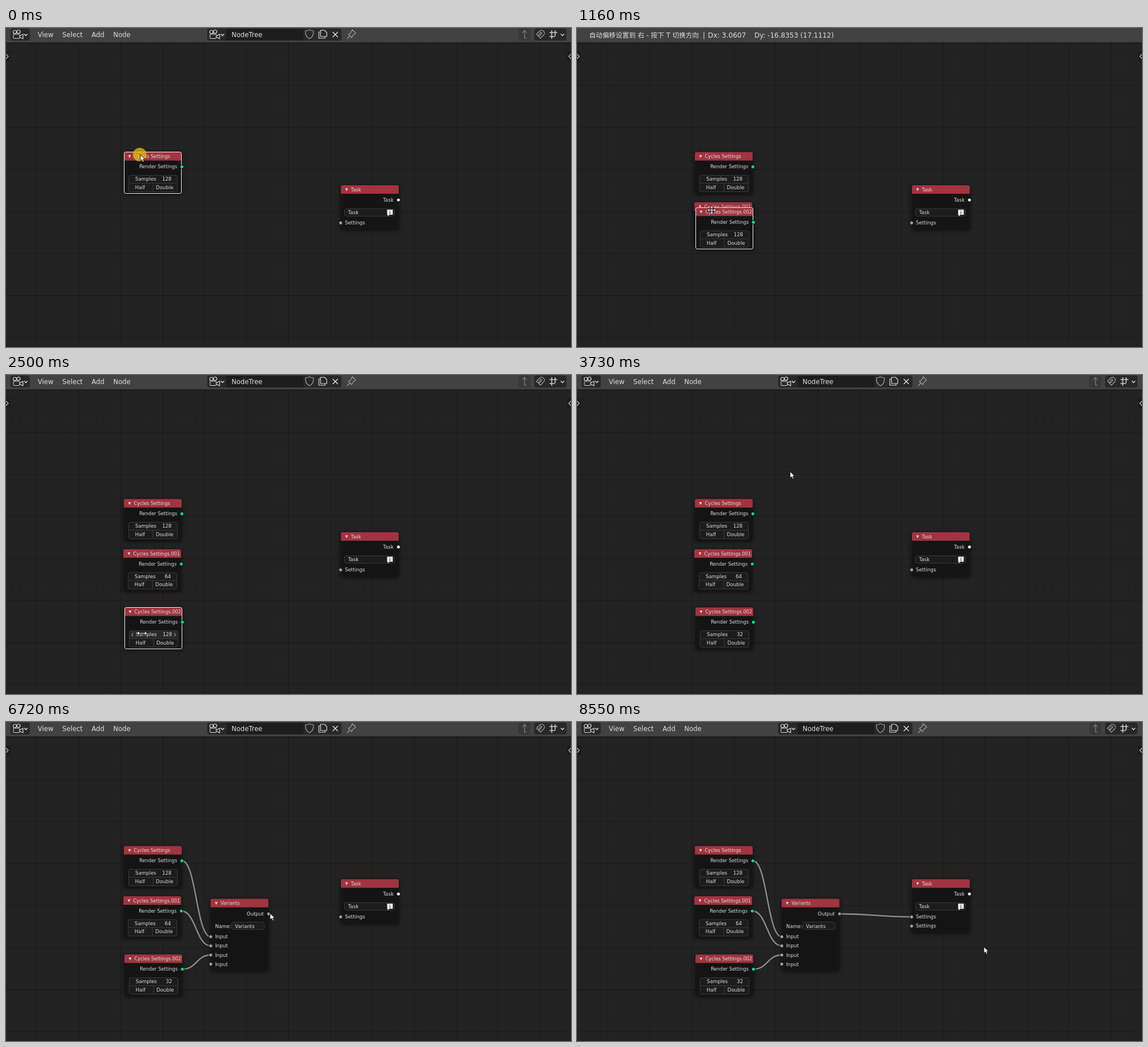
Write an HTML page with a canvas that moves like this. It is 997 px wide and 562 px high and loops after 8.63 s.

```html
<!DOCTYPE html>
<html>
<head>
<meta charset="utf-8">
<style>
html, body { margin: 0; width: 100%; height: 100%; overflow: hidden; background: #232323; }
canvas { display: block; }
</style>
</head>
<body>
<canvas id="stage" width="997" height="562"></canvas>
<script>
const ctx = document.getElementById('stage').getContext('2d');
const LOOP = 8630, STEP = 77, CLICK_MS = 160;
const RED = '#a1343f', GREY = '#a1a1a1', GREEN = '#00e785', BLUE = '#3aa5cf', WHITE = '#f4f4f4';
const INK = '#dedede', EDGE = '#3a3a3a', FIELD = '#1c1c1c';

// The pointer's story: eased moves and clicks, in order of time
const story = [];
const HOME = { x: 237, y: 223 };
const move = (at, length, x, y, mode) => story.push({ at, length, x, y, mode });
const click = at => {
  const { x, y } = story.at(-1) || HOME;
  move(at, 0, x, y, 'click');
};
click(0);
move(320, 560, 236.15, 311.5, 'grab');
move(1010, 150, 237.85037, 320.85292, 'grab');
move(1260, 380, 237.8, 414, 'grab');
click(1720);
move(1870, 310, 238, 370);
click(2330);
move(2400, 90, 240, 455);
move(2560, 120, 238, 474);
click(2790);
click(3030);
move(3270, 200, 393, 181);
click(3490);
move(3600, 110, 376, 170);
move(3800, 310, 221, 499, 'select');
move(4190, 310, 369, 280);
move(5140, 160, 462, 238);
move(5390, 200, 497, 213);
click(5630);
move(6020, 300, 466, 337);
click(6490);
move(6950, 400, 626, 350, 'link');
move(7570, 260, 597, 345, 'link');
move(7980, 400, 661, 377);
move(8550, 0, 718, 396);

function pointer(t) {
  const i = story.findLastIndex(s => s.at <= t);
  const to = story[i], from = story[i - 1] || HOME, age = t - to.at;
  const u = age >= to.length ? 1 : Math.floor(age / STEP) * STEP / to.length;
  const k = u * u * (3 - 2 * u);
  return {
    x: from.x + (to.x - from.x) * k,
    y: from.y + (to.y - from.y) * k,
    from,
    mode: to.mode === 'click' && age >= CLICK_MS ? '' : to.mode,
  };
}

const offset = (a, b) => ({ x: a.x - b.x, y: a.y - b.y });

function text(str, x, y, size = 8.7, color = INK, align = 'left') {
  ctx.font = `${size}px "DejaVu Sans", "Noto Sans CJK SC", sans-serif`;
  ctx.textAlign = align;
  ctx.fillStyle = color;
  ctx.fillText(str, x, y);
  return ctx.measureText(str).width;
}

function paint(shape, fill, stroke, width = 1) {
  if (fill) { ctx.fillStyle = fill; ctx.fill(shape); }
  if (stroke) { ctx.strokeStyle = stroke; ctx.lineWidth = width; ctx.stroke(shape); }
}

function box(x, y, w, h, fill, stroke, r = 3) {
  const shape = new Path2D();
  shape.roundRect(x, y, w, h, r);
  paint(shape, fill, stroke);
}

function dot(x, y, r, fill, stroke, width) {
  const shape = new Path2D();
  shape.arc(x, y, r, 0, 7);
  paint(shape, fill, stroke, width);
}

function icon(d, x, y, stroke, fill, width = 1.2) {
  ctx.save();
  ctx.translate(x, y);
  ctx.lineJoin = 'round';
  paint(new Path2D(d), fill, stroke, width);
  ctx.restore();
}

const socket = (x, y, color) => dot(x, y, 3.1, color, '#111');
const chevron = (x, y) => icon('M-3-1.5L0 1.5L3-1.5', x, y, '#ddd', null, 1.4);
const shield = (x, y, color) => icon('M0-8Q3-6 7-6Q8 4 0 8Q-8 4-7-6Q-3-6 0-8Z', x, y, color);

function grid() {
  ctx.fillStyle = '#232323';
  ctx.fillRect(0, 0, 997, 562);
  for (let i = -34; i <= 34; i++) {
    ctx.fillStyle = i === 0 ? '#151515' : i % 5 ? '#1f1f1f' : '#1a1a1a';
    ctx.fillRect(Math.floor(498.5 + i * 14.8), 0, 1, 562);
    ctx.fillRect(0, Math.floor(471.5 + i * 14.8), 997, 1);
  }
  for (const x of [-4, 990]) box(x, 41, 11, 17, '#1b1b1b');
  icon('M0-4L4 0L0 4M997-4L993 0L997 4', 0, 50, '#c8c8c8');
}

function treeMenu(x) {
  dot(x + 7.5, 7, 3, null, '#ddd', 1.2);
  dot(x + 14, 6.5, 3, null, '#ddd', 1.2);
  box(x + 5, 11, 11, 7.5, null, '#ddd', 1);
  icon('M16 14L22 11V19L16 16', x, 0, '#ddd');
  chevron(x + 27, 12);
}

function toolbar() {
  box(8, 1, 34, 21, '#282828', null, 4);
  treeMenu(8);
  let x = 56;
  for (const name of ['View', 'Select', 'Add', 'Node']) x += text(name, x, 15.5, 11.7) + 15.6;

  box(355, 1, 237, 21, '#282828', null, 4);
  box(389, 1, 136, 21, '#1d1d1d', null, 0);
  treeMenu(355);
  text('NodeTree', 398, 15.5, 11.6);
  shield(535.5, 11, GREY);
  icon('M-4-7H3L7-3V4H-4ZM-4-4H-7V7H4V4', 559, 11, '#ddd');
  icon('M-4.5-4.5L4.5 4.5M4.5-4.5L-4.5 4.5', 581, 11.5, '#e4e4e4', null, 1.4);
  icon('M2-8L8-2L3 2L1 6L-5 0L-1-2ZM-2 3L-7 8', 609, 11, GREY);

  box(904, 1, 21, 21, '#383838', null, 4);
  icon('M5 7H1V-6M-3-2L1-7L5-2', 914, 11, '#858585');
  box(932, 1, 57, 21, '#282828', null, 4);
  icon('M-6 0L0-6A5 5 0 0 1 7 1L1 7L-2 4L3-1A1 1 0 0 0 1-3L-3 3Z', 942, 11, GREY);
  icon('M-7-4H7M-7 3H3M-3-8V7M3-8V2', 966, 12, '#ccc', null, 1.6);
  chevron(982, 12);
}

function transformInfo(moved) {
  const dx = moved.x * 1.8, dy = -moved.y * 1.8;
  text('自动偏移设置到 右 - 按下 T 切换方向', 21.5, 16.5, 11.7);
  text('|', 222, 16.5, 11.7);
  text(`Dx: ${dx.toFixed(4)}`, 231, 16.5, 12.2);
  text(`Dy: ${dy.toFixed(4)} (${Math.hypot(dx, dy).toFixed(4)})`, 313, 16.5, 12);
}

function header(moved) {
  ctx.fillStyle = '#424242';
  ctx.fillRect(0, 0, 997, 25);
  if (moved) transformInfo(moved); else toolbar();
}

function node(x, y, h, title, outline) {
  ctx.save();
  ctx.shadowColor = 'rgba(0,0,0,.75)';
  ctx.shadowBlur = 7;
  ctx.shadowOffsetY = 1.5;
  box(x, y, 102, h, 'rgba(22,22,22,.88)');
  ctx.restore();
  box(x, y, 102, 15, RED, null, [3, 3, 0, 0]);
  icon('M-2.5-2.5H2.5L0 2.5Z', x + 10, y + 8, null, '#e6cfd1');
  text(title, x + 17.5, y + 10.7, 8.35);
  if (outline) box(x + 0.5, y, 101, h, null, outline);
}

// Returns true when the pointer is over the Samples slider
function settingsNode(moved, title, samples, outline, mouse) {
  const x = 208 + Math.round(moved.x), y = 218.5 + moved.y;
  const left = x + 8.5, top = y + 41, mid = top + 14;
  const inside = mouse && mouse.x > left && mouse.x < left + 86;
  const onSlider = inside && mouse.y > top && mouse.y < mid;
  const onHalf = inside && mouse.x < left + 43 && mouse.y > mid && mouse.y < mid + 15;
  node(x, y, 73, title, outline);
  text('Render Settings', x + 94, y + 28.8, 8.4, INK, 'right');
  socket(x + 102.3, y + 26, GREEN);
  box(left, top, 86, 29, FIELD, EDGE);
  if (onSlider) box(left, top, 86, 14, '#282828', EDGE, [3, 3, 0, 0]);
  if (onHalf) box(left, mid, 43, 15, '#2e2e2e', EDGE, [0, 0, 0, 3]);
  icon('M0 0H86M43 0V15', left, mid, EDGE, null, 1);
  text('Samples', x + 20, y + 50.5);
  text(samples, x + 84, y + 50.5, 8.7, INK, 'right');
  text('Half', x + 28.5, y + 65.2, 8.7, INK, 'center');
  text('Double', x + 72, y + 65.2, 8.7, INK, 'center');
  if (onSlider) icon('M7-3L4 0L7 3M79-3L82 0L79 3', left, top + 7, '#ddd', null, 1);
  return onSlider;
}

function taskNode(inputs) {
  node(591, 277, 62 + inputs * 16, 'Task');
  text('Task', 684, 305.8, 8.7, INK, 'right');
  socket(692.5, 303, '#fff');
  box(597.5, 318.5, 88, 13, FIELD, EDGE);
  text('Task', 603.5, 328);
  icon('M-5-5H5V4H-1L-4 7V4H-5Z', 677.5, 325, null, '#eee');
  text('i', 677.5, 328, 9, '#111', 'center');
  for (let i = 0; i < inputs; i++) {
    text('Settings', 598, 346 + i * 16.2);
    socket(590.5, 343.3 + i * 16.2, GREY);
  }
}

const inputY = i => 378.3 + i * 16.1;

function variantsNode(outline) {
  node(361, 311.5, 126, 'Variants', outline);
  text('Output', 455, 340.8, 8.7, INK, 'right');
  socket(463.3, 338, GREY);
  text('Name:', 369, 362.6);
  box(398.5, 352.5, 57, 13, FIELD, EDGE);
  text('Variants', 404, 362.5, 8.5);
  for (let i = 0; i < 4; i++) {
    text('Input', 369, inputY(i) + 3);
    socket(361.3, inputY(i), GREY);
  }
}

function link(x0, y0, x1, y1) {
  const mid = (x0 + x1) / 2;
  const d = `M${x0} ${y0}C${mid} ${y0} ${mid} ${y1} ${x1} ${y1}`;
  icon(d, 0, 0, 'rgba(10,10,10,.6)', null, 4.6);
  icon(d, 0, 0, '#858585', null, 2.8);
}

// The shortcut letter is underlined
function pieButton(x, y, w, str, key, hot) {
  box(x, y, w, 28, hot ? '#272727' : '#1e1e1e', '#2f2f2f');
  text(str, x + 29, y + 17.5, 11.6, '#ededed');
  const at = str.indexOf(key);
  ctx.fillRect(x + 29 + ctx.measureText(str.slice(0, at)).width, y + 19.5, ctx.measureText(key).width, 1);
}

function pieRing(mouse) {
  const dx = mouse.x - 369, dy = mouse.y - 280, angle = Math.atan2(dy, dx);
  const ring = (start, end, width, color) => {
    const shape = new Path2D();
    shape.arc(369.5, 280, 17.5, start, end);
    paint(shape, null, color, width);
  };
  ring(0, 7, 8, '#303030');
  ring(0, 7, 6.5, '#202020');
  if (Math.hypot(dx, dy) > 12) ring(angle - 0.4, angle + 0.4, 7.5, '#a02b2b');
}

function pieMenu(mouse) {
  text('RSN Helper', 369, 246, 11.6, GREY, 'center');
  pieRing(mouse);
  const panel = 'rgba(22,22,22,.92)', border = '#363636';
  const row = mouse.x > 453 ? Math.floor((mouse.y - 168) / 29.6) : -1;
  box(448.5, 163.5, 180, 98, panel, border);
  [['Merge Selection', 'M'], ['Make Variants', 'V'], ['Split active to selected', 'S']]
    .forEach(([name, key], i) => pieButton(453.5, 168.5 + i * 29.6, 170, name, key, i === row));
  icon('M-8-4H-3Q0-4 1 0Q0 4-3 4H-8M1 0H8M5-3L8 0L5 3', 466, 182.5, '#ddd');
  icon('M-7-6H-3V-2H-7ZM3-6H7V-2H3ZM-3-4H3M0-4V6H-4', 466, 212, '#aaa');
  icon('M-8 0H7M-1-4V4M-1-4H7M-1 4H7', 466, 241.5, '#ddd');

  box(448.5, 316.5, 158, 81, panel, border);
  pieButton(453.5, 320.5, 148, 'Simple Task', 'T');
  box(458, 326.5, 16, 16, null, '#eee', 1);
  icon('M-6-4H-1V-1H-6ZM2-4H6V-1H2ZM-6 2H-1V5H-6ZM2 2H6V5H2Z', 466, 334.5, '#eee');
  pieButton(453.5, 364.5, 148, 'Draw Nodes', 'D');
  icon('M-8 8L-6 2L4-8L8-4L-2 6Z', 466, 378, null, '#e4e4e4');

  pieButton(311.5, 391.5, 115, 'Quick Search', 'Q');
  dot(327, 403, 5, null, '#ddd', 1.5);
  icon('M-2 2L-7 7', 325, 405, '#ddd', null, 1.5);
  icon('M-7 0Q0-8 7 0Q0 8-7 0Z', 323, 438, null, '#b5b5b5');
  dot(323, 438, 2, '#b5b5b5', '#232323', 1.5);
  text('NodeTree', 340, 442.5, 11.6, GREY);
  box(404.5, 425.5, 22, 26, '#202020', '#2e2e2e');
  shield(416, 438.5, '#8c8c8c');
}

const CURSORS = {
  arrow: 'M0 0V11.5L2.7 9L4.6 13.2L6.7 12.3L4.8 8.2H8.4Z',
  resize: 'M-9 0L-5-4V-1H5V-4L9 0L5 4V1H-5V4Z',
  grab: 'M0-8L3-4H1V-1H4V-3L8 0L4 3V1H1V4H3L0 8L-3 4H-1V1H-4V3L-8 0L-4-3V-1H-1V-4H-3Z',
};

function draw(t) {
  const mouse = pointer(t), { mode } = mouse;
  const first = offset(pointer(Math.min(t, 1000)), HOME);
  const second = offset(pointer(Math.min(t, 1720)), HOME);
  const copied = t >= 320, copiedTwice = t >= 1010;
  const selected = t >= 4190 && t < 6490;
  const variants = t >= 5790, linked = t >= 7980;
  const hover = t >= 1870 && t < 3270 && mouse;
  let cursor = mode === 'grab' ? 'grab' : 'arrow';

  grid();
  if (variants) [[0, 0], [-1, 88.5], [1, 191]].forEach(([dx, dy], i) => link(310.3 + dx, 244.5 + dy, 361.3, inputY(i)));
  if (linked) link(463.3, 338, 590.5, 343.3);
  else if (mode === 'link') link(463.3, 338, mouse.x, mouse.y);

  taskNode(linked ? 2 : 1);
  const copy = (moved, title, samples, outline) => {
    if (settingsNode(moved, title, samples, outline, hover)) cursor = 'resize';
  };
  copy({ x: 0, y: 0 }, 'Cycles Settings', 128, copied ? selected && BLUE : WHITE);
  if (copied) copy(first, 'Cycles Settings.001', t < 2330 ? 128 : 64, copiedTwice ? selected && BLUE : WHITE);
  if (copiedTwice) {
    const samples = t < 2790 ? 128 : t < 3030 ? 64 : 32;
    copy(second, 'Cycles Settings.002', samples, (t < 3490 || selected) && WHITE);
  }
  if (variants) variantsNode(selected && BLUE);

  header(mode === 'grab' && (copiedTwice ? offset(second, first) : first));

  if (mode === 'select') {
    const { from } = mouse;
    ctx.setLineDash([4, 4]);
    box(mouse.x, mouse.y, from.x - mouse.x, from.y - mouse.y, 'rgba(255,255,255,.04)', '#c8c8c8', 0);
    ctx.setLineDash([]);
  }
  if (t >= 4820 && !variants) pieMenu(mouse);
  if (mode && mode !== 'grab') dot(mouse.x - 1, mouse.y, 12, 'rgba(218,186,8,.78)');
  icon(CURSORS[cursor], mouse.x, mouse.y, '#111', '#fff', 1);
}

function tick() {
  draw(performance.now() % LOOP);
  requestAnimationFrame(tick);
}
tick();
</script>
</body>
</html>
```
